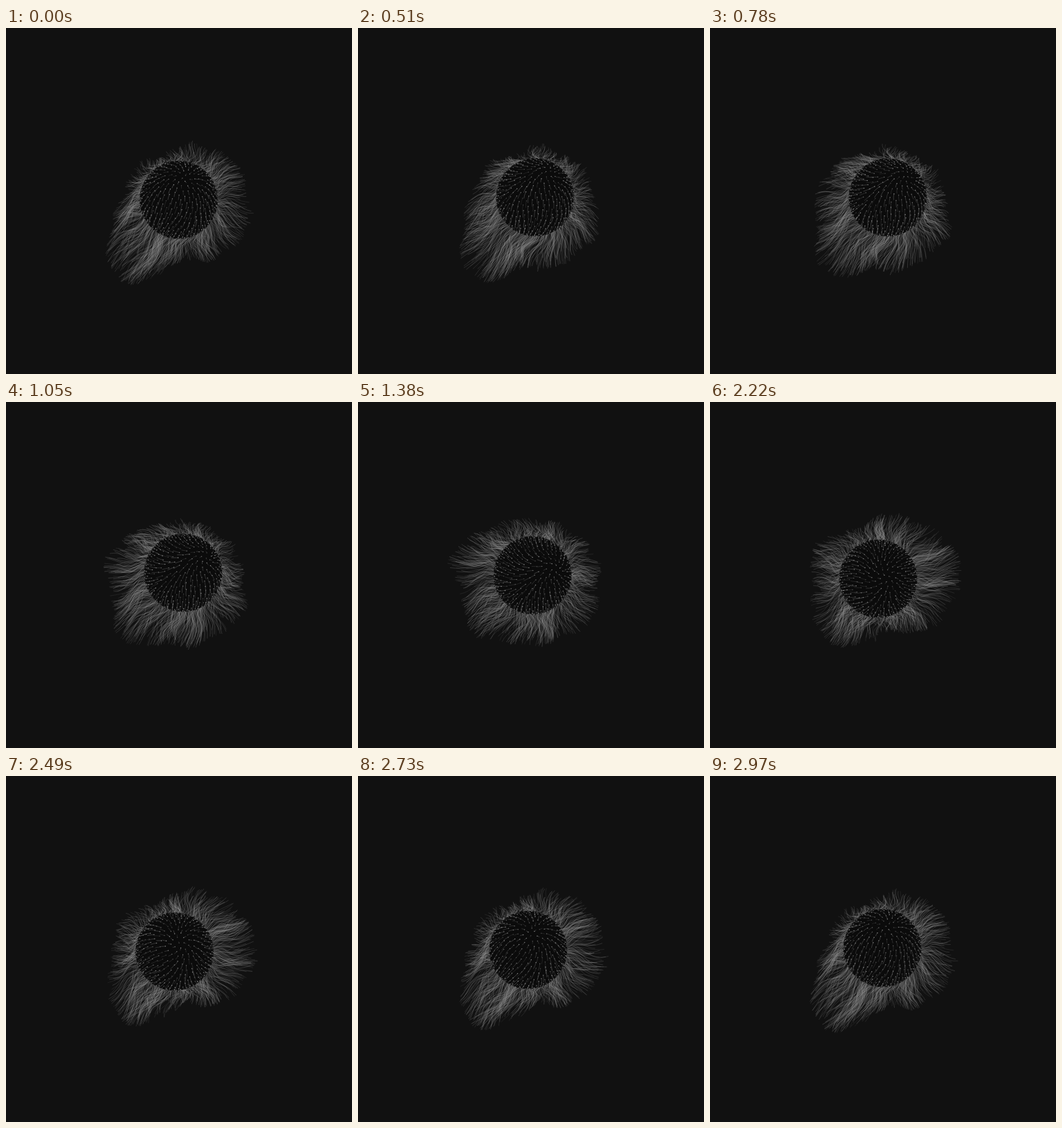
Animation, 500 px wide and 500 px high, one loop 3 s. Source, as an HTML page with a canvas:

```html
<!DOCTYPE html>
<html lang="en">
<head>
<meta charset="utf-8">
<title>Hairy sphere</title>
<style>
html, body { margin: 0; width: 100%; height: 100%; overflow: hidden; background: #111; }
canvas { display: block; width: 500px; height: 500px; }
</style>
</head>
<body>
<canvas id="stage" width="500" height="500"></canvas>
<script>
const ctx = document.getElementById('stage').getContext('2d');
const LOOP = 3000, STEP = 30, TAU = Math.PI * 2, GOLDEN = 2.39996;
const R = 56.5, OX = 248, OY = 250, SEGMENTS = 14;
const TAIL = 2.27;

let seed = 41;
const rand = () => (seed = (seed * 16807) % 2147483647) / 2147483647;

// Periodic swing, +1 when the loop fraction t equals peak.
const swing = (t, peak) => Math.cos(TAU * (t - peak));
const bump = (angle, at, width) => Math.exp((Math.cos(angle - at) - 1) / (width * width));

const centre = t => [250 + 7 * swing(t, 0.26), 250 - 5.5 * swing(t, 0.2)];
const parting = t => [270 + 20 * swing(t, 0.37), 231 + 25 * swing(t, 0.65)];

// Distance of the longest tips from the middle, as lobes around a round coat.
function reachAt(a, t) {
  const tuft = 4.8 - 0.25 * swing(t, 0.45);
  return 84 +
    bump(a, TAIL, 0.34) * (42 + 15 * swing(t, 0.02)) +
    bump(a, 3.4, 0.45) * (14 - 19 * swing(t, 0.05)) +
    bump(a, 6, 0.45) * (16 + 11 * swing(t, 0.77)) +
    bump(a, 0.6, 0.42) * 20 +
    bump(a, 1.35, 0.35) * (4 + 10 * swing(t, 0.35)) +
    bump(a, tuft, 0.2) * (12 + 6 * swing(t, 0.7)) -
    bump(a, 4.5, 0.5) * 13 +
    3 * Math.sin(7 * a - TAU * t) + 2 * Math.sin(13 * a + TAU * t);
}

const hairs = Array.from({ length: 940 }, (_, i) => ({
  angle: (i * GOLDEN) % TAU,
  root: 0.76 + 0.24 * rand(),
  reach: 0.62 + 0.4 * Math.sqrt(rand()),
  lean: (rand() - 0.5) * 0.3,
  phase: rand() * 2,
  wave: 2 + 4 * rand(),
  alpha: 0.13 + 0.2 * rand()
}));

// Evenly spread roots on the visible half of the sphere.
const FRONT = 330;
const roots = Array.from({ length: FRONT }, (_, i) => {
  const z = 1 - (i + 0.5) / FRONT, rho = Math.sqrt(1 - z * z);
  const a = i * GOLDEN + (rand() - 0.5) * 0.08;
  return { x: R * rho * Math.cos(a), y: R * rho * Math.sin(a), shade: rand() };
});

function drawCoat(t) {
  const turn = t * TAU;
  const pull = 0.33 + 0.2 * swing(t, 0.05);
  const trail = Array.from({ length: SEGMENTS + 1 }, (_, k) => centre(t - 0.08 * k / SEGMENTS));
  ctx.lineWidth = 0.8;
  ctx.strokeStyle = '#9c9c9c';
  for (const h of hairs) {
    const d = TAIL - h.angle;
    const drift = 0.09 * Math.sin(5 * h.angle + turn) + 0.06 * Math.sin(11 * h.angle - turn);
    const a = h.angle + pull * Math.sin(d) * (1 + Math.cos(d)) / 2 + h.lean + drift;
    const reach = reachAt(a, t) * h.reach;
    const ca = Math.cos(a), sa = Math.sin(a);
    const tx = OX + reach * ca, ty = OY + reach * sa;
    const rx = R * h.root * Math.cos(h.angle), ry = R * h.root * Math.sin(h.angle);
    ctx.globalAlpha = h.alpha;
    ctx.beginPath();
    for (let k = 0; k <= SEGMENTS; k++) {
      const p = k / SEGMENTS;
      const m = 0.6 * p + 0.4 * p * p;
      const w = h.wave * Math.sin(Math.PI * p * 0.8) *
        Math.sin(6.5 * p - turn * 2 + 3 * h.angle + h.phase);
      ctx.lineTo(
        (trail[k][0] + rx) * (1 - m) + tx * m - w * sa,
        (trail[k][1] + ry) * (1 - m) + ty * m + w * ca
      );
    }
    ctx.stroke();
  }
  ctx.globalAlpha = 1;
}

function drawSphere(t) {
  const [cx, cy] = centre(t), [fx, fy] = parting(t);
  ctx.save();
  ctx.translate(cx, cy);
  ctx.beginPath();
  ctx.arc(0, 0, R, 0, TAU);
  ctx.fillStyle = '#0b0b0b';
  ctx.fill();
  ctx.clip();
  ctx.lineWidth = 0.75;
  ctx.strokeStyle = '#8c8c8c';
  ctx.fillStyle = '#a8a8a8';
  for (const r of roots) {
    const dx = r.x - (fx - cx), dy = r.y - (fy - cy);
    const length = 2 + 8 * Math.min(1, Math.hypot(dx, dy) / 40);
    const bend = 0.35 * Math.sin(r.x / 24 + r.y / 31 - TAU * t);
    const a = Math.atan2(dy, dx) + bend, b = a + bend * 0.6;
    ctx.globalAlpha = 0.2 + 0.3 * r.shade;
    ctx.beginPath();
    ctx.moveTo(r.x, r.y);
    ctx.quadraticCurveTo(
      r.x + length * 0.5 * Math.cos(a), r.y + length * 0.5 * Math.sin(a),
      r.x + length * Math.cos(b), r.y + length * Math.sin(b)
    );
    ctx.stroke();
    ctx.globalAlpha = 0.3 + 0.5 * r.shade;
    ctx.beginPath();
    ctx.arc(r.x, r.y, 0.75, 0, TAU);
    ctx.fill();
  }
  ctx.restore();
}

function draw(ms) {
  const t = Math.floor((ms % LOOP) / STEP) * STEP / LOOP;
  ctx.fillStyle = '#111';
  ctx.fillRect(0, 0, 500, 500);
  drawCoat(t);
  drawSphere(t);
}

const start = performance.now();
function tick() {
  draw(performance.now() - start);
  requestAnimationFrame(tick);
}
tick();
</script>
</body>
</html>
```
